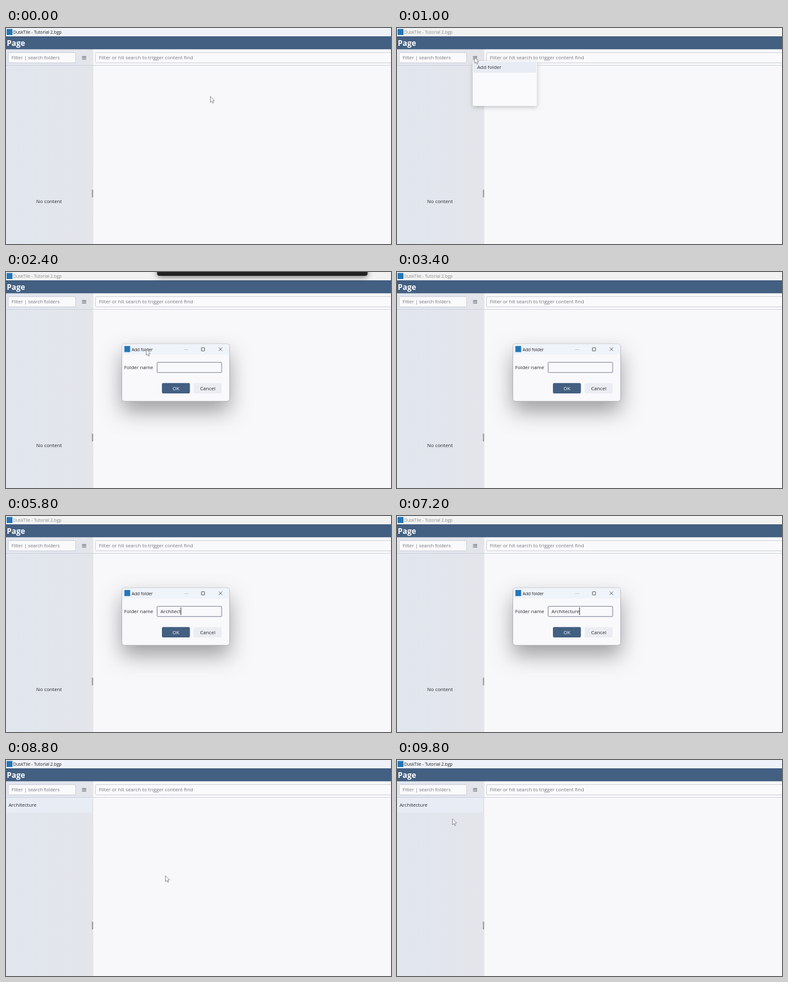
Write an HTML page with a canvas that moves like this. It is 600 px wide and 338 px high and loops after 9900 ms.

```html
<!DOCTYPE html>
<html lang="en">
<head>
<meta charset="utf-8">
<title>Add folder</title>
<style>
  html, body { margin: 0; width: 100%; height: 100%; overflow: hidden; background: #f8f8fb; }
  canvas { display: block; width: 600px; height: 338px; }
</style>
</head>
<body>
<canvas id="stage"></canvas>
<script>
const W = 600, H = 338, LOOP = 9900, STEP = 100;
const canvas = document.getElementById('stage');
const ctx = canvas.getContext('2d');
const dpr = window.devicePixelRatio || 1;
canvas.width = W * dpr;
canvas.height = H * dpr;

const FONT = '"Open Sans", "Noto Sans", sans-serif';
const NAVY = '#435f81', INK = '#2b2d33', HINT = '#77797e', LOGO = '#2376b7';
const PAPER = '#f9f9fc', EDGE = '#c5c8ce', ROW = '#e8ecf5', BUTTON = '#ecedf2';
const BODY = 7.7, SMALL = 6.75;

const WORD = 'Architecture', KEY_TIME = 182, BLINK = 500;
const TIME = {
  menu: 900, pick: 1900, open: 2100, grab: 2200, drop: 2400, focus: 2900,
  type: 4200, leave: 8100, hover: 8400, close: 8700, away: 9300, rest: 9800
};

// Where the pointer stops, and from when until when
const STOPS = [
  { x: 318.5, y: 107, from: 0, to: 0 },
  { x: 121, y: 46, from: 800, to: 1000 },
  { x: 133.5, y: 58, from: TIME.pick, to: 2000 },
  { x: 354.5, y: 189, from: TIME.grab, to: TIME.grab },
  { x: 218.5, y: 121, from: TIME.drop, to: 2700 },
  { x: 262, y: 149, from: TIME.focus, to: TIME.leave },
  { x: 248.5, y: 181, from: TIME.hover, to: TIME.away },
  { x: 86.5, y: 92, from: TIME.rest, to: LOOP }
];

const between = (t, a, b) => t >= a && t < b;
const clamp = (v, a, b) => Math.min(Math.max(v, a), b);
const mix = (a, b, k) => a + (b - a) * k;
const smooth = k => k * k * (3 - 2 * k);

function pointerAt(t) {
  const i = STOPS.findLastIndex(s => s.from <= t);
  const a = STOPS[i], b = STOPS[i + 1] || a;
  const k = smooth(clamp((t - a.to) / (b.from - a.to || 1), 0, 1));
  return [mix(a.x, b.x, k), mix(a.y, b.y, k)];
}

function caretOn(t) {
  if (t >= TIME.leave) return false;
  const typed = TIME.type + WORD.length * KEY_TIME;
  if (between(t, TIME.type, typed)) return true;
  const since = t < TIME.type ? t - TIME.type + 600 : t - typed + 284;
  return Math.floor(since / BLINK) % 2 === 0;
}

function rect(x, y, w, h, color) {
  ctx.fillStyle = color;
  ctx.fillRect(x, y, w, h);
}

function box(x, y, w, h, r, fill, stroke) {
  ctx.beginPath();
  ctx.roundRect(x, y, w, h, r);
  ctx.fillStyle = fill;
  ctx.fill();
  if (!stroke) return;
  ctx.strokeStyle = stroke;
  ctx.lineWidth = 0.75;
  ctx.stroke();
}

function text(str, x, y, size = BODY, color = INK, align = 'left', weight = 400) {
  ctx.font = `${weight} ${size}px ${FONT}`;
  ctx.fillStyle = color;
  ctx.textAlign = align;
  ctx.fillText(str, x, y);
}

function shadowed(alpha, blur, dy, draw) {
  ctx.save();
  ctx.shadowColor = `rgba(0,0,0,${alpha})`;
  ctx.shadowBlur = blur * dpr;
  ctx.shadowOffsetY = dy * dpr;
  draw();
  ctx.restore();
}

function searchField(x, w, hint, size) {
  box(x, 38.5, w, 16, 1.5, '#fafafc', EDGE);
  text(hint, x + 5.2, 49.3, size, HINT);
}

function button(label, x, fill, color) {
  box(x, 61.5, 43.6, 16.3, 2, fill);
  text(label, x + 21.8, 72.5, BODY, color, 'center');
}

function drawWindow(active, added) {
  rect(0, 0, W, H, '#f8f8fb');
  const side = ctx.createLinearGradient(0, 0, 136, 0);
  side.addColorStop(0, '#e1e6ef');
  side.addColorStop(1, '#e3e5ea');
  rect(0, 33, 136, H - 33, side);

  rect(0, 0, W, 13, active ? '#eff2f9' : '#f2f2f2');
  rect(1, 1.5, 9, 9.5, LOGO);
  text('DuskTile - Tutorial 2.bgp', 11, 9.4, SMALL, active ? '#222' : '#8c8c8c');
  rect(0, 13, W, 20.3, NAVY);
  text('Page', 1.3, 27.6, 11.9, '#fff', 'left', 700);

  rect(0, 58, W, 0.8, '#cbd0dc');
  searchField(3.5, 105, 'Filter | search folders', 7.5);
  searchField(139.5, W, 'Filter or hit search to trigger content find', 7.77);
  for (let i = 0; i < 3; i++) rect(118.5, 44 + i * 2.2, 6.5, 0.8, '#4c4e55');

  if (added) {
    rect(0, 59, 134, 23.5, ROW);
    text(WORD, 4, 73.2);
  } else {
    text('No content', 67, 273.8, BODY, INK, 'center');
  }
  rect(133.7, 253, 2.3, 12, '#a4a5aa');
}

function drawMenu() {
  shadowed(0.22, 6, 2, () => box(118, 52, 100, 70, 2, '#fafafc'));
  rect(119, 53, 98, 17, ROW);
  text('Add folder', 125, 64.2);
}

function drawDialog(x, y, t) {
  ctx.save();
  ctx.translate(x, y);
  shadowed(0.36, 32, 16, () => box(0, 0, 168, 90, 4, PAPER));
  box(0, 0, 168, 90, 4, PAPER, 'rgba(90,95,105,.5)');
  box(0.3, 0.3, 167.4, 16.7, [4, 4, 0, 0], '#eff3fa');
  rect(4, 3.5, 9, 9.5, LOGO);
  text('Add folder', 15.2, 11.3, SMALL, '#222');

  rect(97, 8.7, 6.5, 0.7, '#bdc0c6');
  box(124, 6.2, 5, 5, 0.5, '#eff3fa', '#444');
  ctx.beginPath();
  for (const d of [-2.6, 2.6]) {
    ctx.moveTo(153.8 - d, 6);
    ctx.lineTo(153.8 + d, 11.2);
  }
  ctx.stroke();

  text('Folder name', 3.6, 39.7);
  box(55, 29, 100.6, 16, 1, PAPER, t < TIME.leave ? '#5d667b' : EDGE);
  const count = clamp(Math.floor((t - TIME.type) / KEY_TIME) + 1, 0, WORD.length);
  const typed = WORD.slice(0, count);
  text(typed, 60.3, 39.7);
  if (caretOn(t)) rect(60.2 + ctx.measureText(typed).width, 30.8, 0.8, 12, '#222');

  button('OK', 62.5, t < TIME.hover ? NAVY : '#587291', '#fff');
  button('Cancel', 112, BUTTON, INK);
  ctx.restore();
}

function drawSnapBar() {
  shadowed(0.5, 9, 2, () => box(235.5, -12, 328, 18, 4, '#222'));
}

function drawPointer(x, y) {
  ctx.beginPath();
  ctx.moveTo(x, y);
  ctx.lineTo(x, y + 9.3);
  ctx.lineTo(x + 2.1, y + 7.4);
  ctx.lineTo(x + 3.6, y + 10.7);
  ctx.lineTo(x + 5, y + 10.1);
  ctx.lineTo(x + 3.6, y + 6.9);
  ctx.lineTo(x + 6.5, y + 6.7);
  ctx.closePath();
  ctx.fillStyle = '#fff';
  ctx.fill();
  ctx.strokeStyle = '#6d6e74';
  ctx.lineWidth = 0.7;
  ctx.stroke();
}

function draw(t) {
  ctx.setTransform(dpr, 0, 0, dpr, 0, 0);
  const added = t >= TIME.close;
  drawWindow(t < TIME.menu || added, added);
  if (between(t, TIME.menu, TIME.pick)) drawMenu();
  if (between(t, TIME.grab + STEP, TIME.drop + 3 * STEP)) drawSnapBar();
  if (between(t, TIME.open, TIME.close)) {
    // The dialog follows the pointer while its title bar is dragged
    const [gx, gy] = pointerAt(clamp(t, TIME.grab, TIME.drop));
    drawDialog(gx - 38, gy - 8.7, t);
  }
  if (!between(t, TIME.focus, TIME.leave)) drawPointer(...pointerAt(t));
}

const start = performance.now();
function tick() {
  const t = (performance.now() - start) % LOOP;
  draw(Math.floor(t / STEP) * STEP);
  requestAnimationFrame(tick);
}
tick();
</script>
</body>
</html>
```
